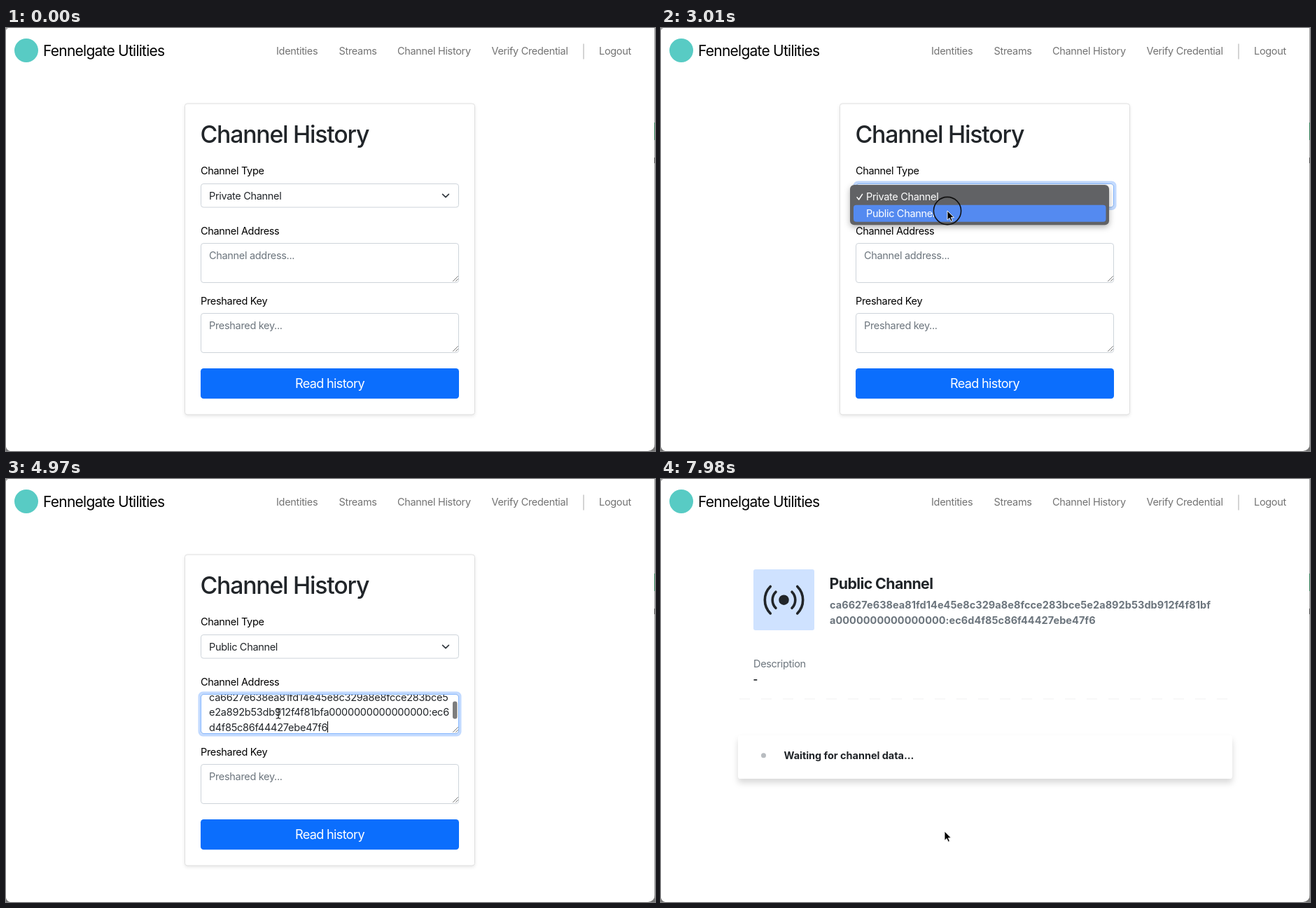
Animation, 927 px wide and 604 px high, one loop 8 s. Source, as an HTML page:

```html
<!DOCTYPE html>
<html lang="en">
<head>
<meta charset="utf-8">
<title>Channel History</title>
<style>
  html, body { margin: 0; width: 100%; height: 100%; overflow: hidden; background: #fff; }
  svg { display: block; }
  text {
    font: 14.5px Inter, "Liberation Sans", sans-serif;
    font-optical-sizing: none; font-feature-settings: "calt" 0;
    letter-spacing: -.022em; fill: #000; white-space: pre;
  }
  .brand { font-size: 21px; letter-spacing: -.036em; }
  .nav text { fill: #737373; }
  .h1 { font-size: 33.8px; font-weight: 500; letter-spacing: -.036em; fill: #212529; }
  .h4 { font-size: 21.3px; font-weight: 700; letter-spacing: -.027em; fill: #212529; }
  .bold { font-weight: 700; letter-spacing: -.003em; fill: #212529; }
  .hex { letter-spacing: -.016em; fill: #212529; }
  .address { font-weight: 700; letter-spacing: .003em; fill: #6c757d; }
  .muted { fill: #6c757d; }
  .dark { fill: #212529; }
  .label { font-size: 18.1px; letter-spacing: -.037em; fill: #fff; }
  .menu text { fill: #fff; }
  .box { fill: #fff; stroke: #ced4da; }
  .glow { fill: none; stroke: #0d6efd; stroke-opacity: .25; stroke-width: 3.6; }
  .focus { fill: none; stroke: #86b7fe; }
  .line { fill: none; stroke-linecap: round; stroke-linejoin: round; }
  .card { filter: drop-shadow(0 2px 2px rgba(0, 0, 0, .09)); }
  .raised { filter: drop-shadow(0 6px 4px rgba(0, 0, 0, .15)); }
  .menu > rect:first-child { filter: drop-shadow(0 3px 4px rgba(0, 0, 0, .3)); }
</style>
</head>
<body>
<svg width="927" height="604" viewBox="0 0 927 604">
  <defs>
    <clipPath id="area"><rect x="279" y="308" width="367" height="55"/></clipPath>
    <path id="grip" class="line" stroke="#777" d="M0 0l7-7M4 0l3-3"/>
    <path id="waves" class="line" stroke="#212529" d="M2.7 2.7a7.5 7.5 0 0 0 0 10.6M4.82 4.82a4.5 4.5 0 0 0 0 6.36"/>
  </defs>
  <rect width="927" height="604" fill="#fff"/>

  <circle cx="29" cy="32" r="17" fill="#58cbc4"/>
  <text class="brand" x="53" y="39.7">Fennelgate Utilities</text>
  <g class="nav">
    <text x="386" y="37.5">Identities</text>
    <text x="475.5" y="37.5">Streams</text>
    <text x="559" y="37.5">Channel History</text>
    <text x="693.5" y="37.5">Verify Credential</text>
    <text x="847" y="37.5">Logout</text>
  </g>
  <path d="M825 22.5V44.5" stroke="#c6c6c6" stroke-width="1.5"/>

  <g id="form">
    <rect class="card" x="255.5" y="108" width="414" height="444" rx="3.6" fill="#fff" stroke="#dfdfdf"/>
    <text class="h1" x="277.5" y="163.5">Channel History</text>

    <text x="278" y="209.3">Channel Type</text>
    <rect class="box" x="278.5" y="222.5" width="368" height="33.5" rx="3.6"/>
    <g id="typeFocus">
      <rect class="glow" x="276.3" y="220.3" width="372.4" height="38" rx="5"/>
      <rect class="focus" x="278.5" y="222.5" width="368" height="33.5" rx="3.6"/>
    </g>
    <text id="type" class="dark" x="290" y="245"></text>
    <path class="line" d="M623.6 237.3l4.4 4.4 4.4-4.4" stroke="#343a40" stroke-width="1.7"/>

    <text x="278" y="295">Channel Address</text>
    <rect class="box" x="278.5" y="307.5" width="368" height="56" rx="3.6"/>
    <g id="areaFocus">
      <rect class="glow" x="276.3" y="305.3" width="372.4" height="60.4" rx="5"/>
      <rect class="focus" x="278.5" y="307.5" width="368" height="56" rx="3.6"/>
    </g>
    <text id="hint" class="muted" x="290" y="330.3">Channel address...</text>
    <g id="pasted" clip-path="url(#area)">
      <text class="hex" x="290" y="316.5">ca6627e638ea81fd14e45e8c329a8e8fcce283bce5</text>
      <text class="hex" x="290" y="338.2">e2a892b53db912f4f81bfa0000000000000000:ec6</text>
      <text class="hex" x="290" y="360">d4f85c86f44427ebe47f6</text>
      <rect id="thumb" x="638" y="317.5" width="6.5" height="25" rx="3.2" fill="#7d7d7d"/>
    </g>
    <rect id="caret" width="1" height="16"/>
    <use href="#grip" x="638.5" y="361.5"/>

    <text x="278" y="395">Preshared Key</text>
    <rect class="box" x="278.5" y="407.5" width="368" height="56" rx="3.6"/>
    <text class="muted" x="290" y="430.4">Preshared key...</text>
    <use href="#grip" x="638.5" y="461.5"/>

    <rect id="button" x="278" y="486" width="369" height="43.3" rx="4.3"/>
    <text class="label" x="413" y="514.4">Read history</text>

    <g id="menu" class="menu">
      <rect x="270" y="224" width="370" height="57.3" rx="6" fill="#616265"/>
      <rect id="pick" x="275" width="360.5" height="24" rx="4" fill="#548af0"/>
      <path class="line" d="M280 241.8l2.6 3.2 5-7.6" stroke="#fff" stroke-width="1.5"/>
      <text x="293" y="245.5">Private Channel</text>
      <text x="293" y="269.5">Public Channel</text>
    </g>
  </g>

  <g id="result">
    <rect x="132" y="129" width="87" height="87" rx="3" fill="#cfe2ff"/>
    <g transform="translate(146.5 143.7) scale(3.625)">
      <use href="#waves"/>
      <use href="#waves" transform="matrix(-1 0 0 1 16 0)"/>
      <circle cx="8" cy="8" r="2" fill="#212529"/>
    </g>
    <text class="h4" x="240.5" y="157.2">Public Channel</text>
    <text class="address" x="241" y="185.3">ca6627e638ea81fd14e45e8c329a8e8fcce283bce5e2a892b53db912f4f81bf</text>
    <text class="address" x="241" y="207">a0000000000000000:ec6d4f85c86f44427ebe47f6</text>
    <text class="muted" x="132" y="269.4">Description</text>
    <text class="bold" x="131.5" y="291.3">-</text>
    <path d="M112 314H813" stroke="#f0f0f1" stroke-dasharray="15 16"/>
    <rect class="raised" x="110" y="366" width="706" height="62" rx="3.6" fill="#fff"/>
    <circle id="spinner" cx="146.5" cy="394.7" fill="#6c757d"/>
    <text class="bold" x="175.5" y="400.2">Waiting for channel data...</text>
  </g>

  <path d="M926.5 0V604" stroke="#a3a3a3"/>
  <path d="M926.5 135V160" stroke="#2c7a52"/>
  <path d="M926.5 185V193" stroke="#444"/>
  <path d="M927 594Q926 603 917 604H927ZM0 598Q1 603 6 604H0Z" fill="#777"/>
  <path d="M0 0H3L0 3Z" fill="#aaa"/>

  <g id="pointer">
    <circle id="ring" r="19.6" fill="none" stroke="#111" stroke-width="1.6"/>
    <path id="arrow" d="M0 0V13.2L3.1 10.4 5.2 15.2 7.4 14.2 5.4 9.6H9.4Z" fill="#000" stroke="#fff" stroke-width=".9"/>
    <path id="beam" class="line" d="M-3-7Q0-7 0-5Q0-7 3-7M0-5V5M-3 7Q0 7 0 5Q0 7 3 7M-1.5 2H1.5" stroke="#222" stroke-width="1.1"/>
    <path id="hand" class="line" d="M-1.5 9V1Q0-1 1.5 1V6L8 7.5Q9.5 8 9 10L8 15H0L-4.5 9.5Q-4 7-1.5 9Z" style="fill:#fff" stroke="#000"/>
  </g>
</svg>
<script>
  const LOOP = 8000, STEP = 70;
  const el = id => document.getElementById(id);
  const set = (id, attrs) => { for (const k in attrs) el(id).setAttribute(k, attrs[k]); };
  const alpha = (id, value) => set(id, { opacity: +value });
  const ramp = (t, from, to) => Math.min(1, Math.max(0, (t - from) / (to - from)));
  const within = (t, from, to) => t >= from && t < to;

  // Pointer legs: start, end, target x, target y
  const legs = [[2450, 2590, 409, 261], [3500, 3800, 389, 335], [5300, 5760, 405, 503]];
  const clicks = [[1680, 2170], [2730, 3200], [3850, 4130], [5880, 6160]];

  function pointerAt(t) {
    let x = 414.5, y = 246;
    for (const [from, to, tx, ty] of legs) {
      const p = ramp(t, from, to), e = p * p * (3 - 2 * p);
      x += (tx - x) * e;
      y += (ty - y) * e;
    }
    return [x, y];
  }

  function draw(t) {
    const done = t >= 6230, pasted = t >= 4970;
    const [x, y] = pointerAt(t);

    alpha('form', !done);
    alpha('result', done);
    el('type').textContent = t < 3360 ? 'Private Channel' : 'Public Channel';
    alpha('typeFocus', ramp(t, 2100, 2300) - ramp(t, 3850, 4000));
    alpha('menu', within(t, 2170, 3395) ? 1 - ramp(t, 3150, 3395) : 0);
    set('pick', { y: y < 253 ? 228.5 : 252.7 });

    alpha('areaFocus', ramp(t, 3850, 4000) - ramp(t, 5880, 6030));
    alpha('hint', !pasted);
    alpha('pasted', pasted);
    alpha('thumb', 1 - ramp(t, 5500, 5750));
    alpha('caret', within(t, 4040, 4550) || within(t, 4970, 5470));
    set('caret', pasted ? { x: 459, y: 346 } : { x: 289.5, y: 317 });

    const onButton = !done && y > 486;
    set('button', { fill: onButton ? '#0b5ed7' : '#0b6efd' });

    const onArea = !done && t > 3400 && (within(y, 308, 364) || within(y, 408, 464));
    set('pointer', { transform: `translate(${x} ${y})` });
    alpha('pointer', ramp(t, 700, 1540));
    alpha('ring', clicks.some(([from, to]) => within(t, from, to)));
    alpha('beam', onArea);
    alpha('hand', onButton);
    alpha('arrow', !onArea && !onButton);

    // Grows while fading in, then fades out at full size
    const phase = Math.max(0, t - 6215) / 787 % 1;
    set('spinner', { r: 7.25 * Math.min(1, phase * 2), opacity: 1 - Math.abs(1 - phase * 2) });
  }

  function tick() {
    draw(Math.floor(performance.now() % LOOP / STEP) * STEP);
    requestAnimationFrame(tick);
  }
  tick();
</script>
</body>
</html>
```
